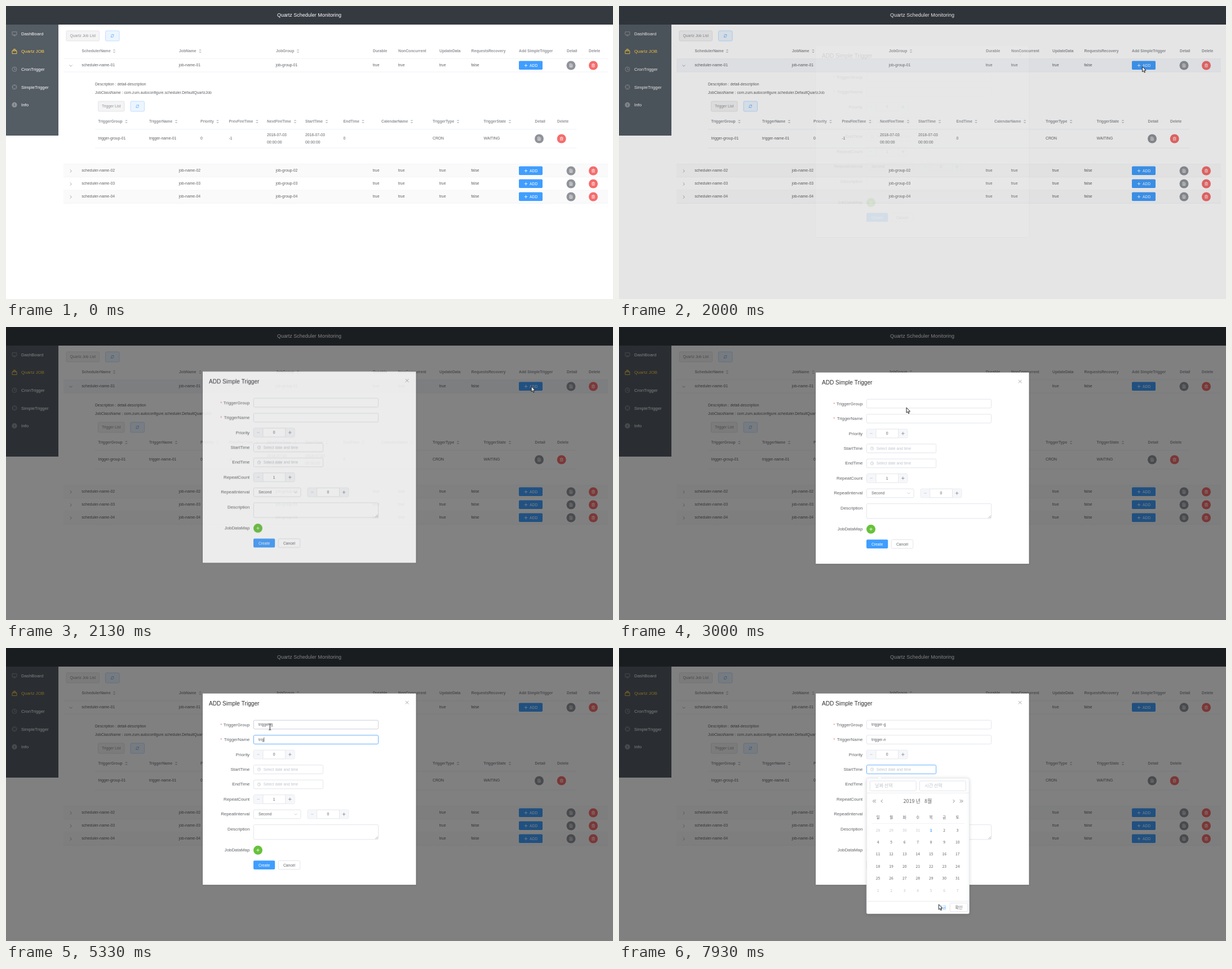
Write an HTML page with a canvas that moves like this. It is 1077x520 px and loops after 8000 ms.

```html
<!DOCTYPE html>
<html lang="en">
<head>
<meta charset="utf-8">
<title>Quartz Scheduler Monitoring</title>
<style>
  html, body { margin: 0; width: 100%; height: 100%; overflow: hidden; background: #fff; }
  canvas { display: block; width: 1077px; height: 520px; }
</style>
</head>
<body>
<canvas id="stage"></canvas>
<script>
const W = 1077, H = 520, LOOP = 8000, TICK = 1000 / 15;
const SANS = '"Liberation Sans", Arial, sans-serif';
const KOREAN = '"Noto Sans CJK KR", "Noto Sans CJK", "Noto Sans CJK JP", "Noto Sans", sans-serif';
const BLUE = '#409eff', RED = '#f56c6c', GREY = '#909399', INK = '#606266';
const BORDER = '#dcdfe6', PALE = '#c0c4cc', LINE = '#ebeef5';

const stage = document.getElementById('stage');
const layer = document.createElement('canvas');
const dpr = window.devicePixelRatio || 1;
const [main, sheet] = [stage, layer].map(el => {
  el.width = Math.round(W * dpr);
  el.height = Math.round(H * dpr);
  const ctx = el.getContext('2d');
  ctx.scale(dpr, dpr);
  return ctx;
});
let c = main;

// ---- helpers ----
const clamp = v => Math.max(0, Math.min(1, v));

function bezier(x1, y1, x2, y2) {
  const at = (a, b, s) => 3 * a * s * (1 - s) ** 2 + 3 * b * s * s * (1 - s) + s ** 3;
  return x => {
    let lo = 0, hi = 1;
    for (let i = 0; i < 24; i++) {
      const mid = (lo + hi) / 2;
      if (at(x1, x2, mid) < x) lo = mid; else hi = mid;
    }
    return at(y1, y2, (lo + hi) / 2);
  };
}
const ease = bezier(.25, .1, .25, 1);
const easeOut = bezier(.23, 1, .32, 1);

function mix(a, b, k) {
  const part = (s, i) => parseInt(s.slice(i, i + 2), 16);
  return `rgb(${[1, 3, 5].map(i => Math.round(part(a, i) + (part(b, i) - part(a, i)) * k))})`;
}

function text(s, x, y, size, color, opt = {}) {
  c.font = `${opt.bold ? 'bold ' : ''}${size}px ${opt.font || SANS}`;
  c.textAlign = opt.align || 'left';
  c.fillStyle = color;
  c.fillText(s, x, y);
}

function box(x, y, w, h, fill, stroke, radius = 2) {
  c.beginPath();
  c.roundRect(x, y, w, h, radius);
  if (fill) { c.fillStyle = fill; c.fill(); }
  if (stroke) { c.strokeStyle = stroke; c.lineWidth = .8; c.stroke(); }
}

function rect(x, y, w, h, fill) {
  c.fillStyle = fill;
  c.fillRect(x, y, w, h);
}

function disc(x, y, r, fill) {
  c.beginPath();
  c.arc(x, y, r, 0, 7);
  c.fillStyle = fill;
  c.fill();
}

function strokePath(d, x, y, color, width = .7) {
  c.save();
  c.translate(x, y);
  c.strokeStyle = color;
  c.lineWidth = width;
  c.stroke(new Path2D(d));
  c.restore();
}

function fillPath(d, x, y, color) {
  c.save();
  c.translate(x, y);
  c.fillStyle = color;
  c.fill(new Path2D(d));
  c.restore();
}

// ---- icons ----
const ICON = {
  plus: 'M-2.8 0H2.8M0 -2.8V2.8',
  minus: 'M-2.3 0H2.3',
  close: 'M-2.8 -2.8L2.8 2.8M2.8 -2.8L-2.8 2.8',
  right: 'M-1.3 -2.6L1.3 0L-1.3 2.6',
  left: 'M1.3 -2.6L-1.3 0L1.3 2.6',
  down: 'M-2.6 -1.3L0 1.3L2.6 -1.3',
  refresh: 'M-2.3 -.4A2.4 2.4 0 0 1 2 -1.4M2.3 -2.6V-1.1H.8M2.3 .4A2.4 2.4 0 0 1 -2 1.4M-2.3 2.6V1.1H-.8',
  page: 'M-2.3 -2.8H1L2.3 -1.5V2.8H-2.3ZM-1.1 -.9H1M-1.1 .4H1.1M-1.1 1.6H1.1',
  trash: 'M-2.8 -1.7H2.8M-1 -1.7V-2.8H1V-1.7M-2.1 -1.7V2.7H2.1V-1.7M-.7 -.4V1.5M.7 -.4V1.5',
  clock: 'M4 0A4 4 0 1 1 -4 0A4 4 0 1 1 4 0M0 -2.5V.3H2.2',
  smallClock: 'M2.7 0A2.7 2.7 0 1 1 -2.7 0A2.7 2.7 0 1 1 2.7 0M0 -1.6V.2H1.5',
  monitor: 'M-4 -3.2H4V2.2H-4ZM-2 3.8H2M0 2.2V3.8',
  goods: 'M-4 -1H4V4H-4ZM-3.3 -1L-2.4 -2.7H2.4L3.3 -1M-1.7 -4H1.7',
  aim: 'M4 0A4 4 0 1 1 -4 0A4 4 0 1 1 4 0M0 -4V-1.7M0 4V1.7M-4 0H-1.7M4 0H1.7'
};
const icon = (name, x, y, color, width) => strokePath(ICON[name], x, y, color, width);

function sorter(x, y) {
  fillPath('M-2.5 -.9L0 -3.3L2.5 -.9ZM-2.5 .9L0 3.3L2.5 .9Z', x, y, PALE);
}

function roundButton(name, x, y, fill) {
  disc(x, y, 8, fill);
  icon(name, x, y, '#fff');
}

function listBar(label, x, y, w) {
  box(x, y, w, 18, '#f4f4f5', '#dedfe2');
  text(label, x + w / 2, y + 11.3, 6.8, GREY, { align: 'center' });
  const bx = x + w + 11;
  box(bx, y, 24.5, 18, '#ecf5ff', '#b3d8ff');
  icon('refresh', bx + 12.2, y + 9, BLUE);
}

// ---- page ----
function drawFrame() {
  rect(0, 0, W, H, '#fff');
  rect(0, 0, W, 33, '#343a40');
  text('Quartz Scheduler Monitoring', 538, 18.7, 8.98, '#fff', { align: 'center' });
  rect(0, 33, 93, 197, '#545c64');
  const menu = [['monitor', 'DashBoard'], ['goods', 'Quartz JOB'], ['clock', 'CronTrigger'],
    ['aim', 'SimpleTrigger'], ['info', 'Info']];
  menu.forEach(([name, label], i) => {
    const y = 49 + 31.6 * i, on = i === 1;
    if (name === 'info') {
      disc(15, y, 4.6, GREY);
      text('i', 15, y + 2.5, 7, '#545c64', { align: 'center', bold: true });
    } else icon(name, 15, y, on ? '#ffd04b' : GREY, .9);
    text(label, 27, y + 2.8, 7.87, on ? '#ffd04b' : '#fff');
  });
}

function header(cols, y) {
  for (const [label, x, sortX] of cols) {
    text(label, x, y + 2.2, 6.78, GREY, { bold: true });
    if (sortX) sorter(sortX, y);
  }
}

const JOB_COLS = [['SchedulerName', 134.5, 192], ['JobName', 307, 344.5], ['JobGroup', 479, 518],
  ['Durable', 651], ['NonConcurrent', 696], ['UpdateData', 769], ['RequestsRecovery', 825.5],
  ['Add SimpleTrigger', 910], ['Detail', 995], ['Delete', 1034]];
const TRIGGER_COLS = [['TriggerGroup', 163.5, 213.5], ['TriggerName', 254, 302], ['Priority', 345, 375.5],
  ['PrevFireTime', 395.5, 445.5], ['NextFireTime', 463, 513], ['StartTime', 531, 569],
  ['EndTime', 598.5, 633.5], ['CalendarName', 666, 720], ['TriggerType', 757, 802],
  ['TriggerState', 847.5, 894], ['Detail', 938.5], ['Delete', 978]];

function jobRow(n, top, hover) {
  const y = top + 11.5, open = n === 1;
  rect(102, top, 966, 23, hover ? '#f5f7fa' : n % 2 ? '#fff' : '#fafafa');
  rect(102, top + 22.6, 966, .8, LINE);
  icon(open ? 'down' : 'right', 115, y + .4, GREY, .8);
  const cells = [`scheduler-name-0${n}`, `job-name-0${n}`, `job-group-0${n}`, 'true', 'true', 'true', 'false'];
  cells.forEach((s, i) => text(s, JOB_COLS[i][1] - .3, y + 1.7, 6.83, INK));
  box(910, y - 8, 42, 15.6, BLUE, null, 1.8);
  icon('plus', 922.5, y, '#fff', .8);
  text('ADD', 929, y + 2.4, 6.75, '#fff');
  roundButton('page', 1002.5, y, GREY);
  roundButton('trash', 1042, y, RED);
}

function drawPage(hover) {
  drawFrame();
  listBar('Quartz Job List', 107, 44, 58.5);
  header(JOB_COLS, 80);
  rect(102, 93.3, 966, .8, LINE);
  jobRow(1, 94, hover);

  text('Description : detail-description', 158, 141.3, 6.75, INK);
  text('JobClassName : com.zum.autoconfigure.scheduler.DefaultQuartzJob', 158, 156, 6.75, INK);
  listBar('Trigger List', 163.5, 169, 46.5);
  header(TRIGGER_COLS, 205);
  rect(158, 218.4, 854, .8, LINE);
  const cells = [['trigger-group-01', 0], ['trigger-name-01', 1], ['0', 2], ['-1', 3], ['0', 6],
    ['CRON', 8], ['WAITING', 9]];
  for (const [s, i] of cells) text(s, TRIGGER_COLS[i][1], 237.2, 6.8, INK);
  for (const x of [463, 531]) {
    text('2018-07-03', x, 230.8, 6.8, INK);
    text('00:00:00', x, 243.7, 6.8, INK);
  }
  roundButton('page', 946, 235.5, GREY);
  roundButton('trash', 985.7, 235.5, RED);
  rect(158, 251.6, 854, .8, LINE);

  rect(102, 280.4, 966, .8, LINE);
  for (let n = 2; n < 5; n++) jobRow(n, 281 + 23 * (n - 2), false);
}

// ---- dialog state: typing and focus, in ticks ----
const FIELDS = {
  group: { value: 'trigger-g', keys: [50, 53, 55, 57, 58, 60, 62, 63, 65], from: 46, fade: 43, to: 69 },
  name: { value: 'trigger-n', keys: [74, 77, 78, 80, 81, 84, 85, 87, 90], from: 69, fade: 69, to: 110 },
  start: { value: '', keys: [], from: 110, fade: 110, to: 999 }
};

function focusColor(f, tick, idle) {
  const k = n => ease(clamp((tick - n + .3) / 3));
  if (tick < f.from) return idle;
  return tick < f.to ? mix(idle, BLUE, k(f.fade)) : mix(BLUE, idle, k(f.to));
}

function caret(f, tick, x, y) {
  if (tick < f.from || tick >= f.to) return;
  const last = Math.max(f.from, ...f.keys.filter(k => k <= tick));
  if ((tick - last) % 16 < 8) rect(x, y - 4, .7, 8, '#303133');
}

function textField(f, y, tick, idle) {
  box(439.4, y - 7.8, 221.2, 15.6, '#fff', focusColor(f, tick, idle));
  const typed = f.value.slice(0, f.keys.filter(k => k <= tick).length);
  text(typed, 448, y + 2.3, 6.85, INK);
  caret(f, tick, 448 + c.measureText(typed).width, y);
}

function stepper(x, y, value) {
  box(x, y - 7.8, 72.6, 15.6, '#fff', BORDER);
  rect(x + .4, y - 7.4, 16, 14.8, '#f5f7fa');
  rect(x + 56.2, y - 7.4, 16, 14.8, '#f5f7fa');
  rect(x + 16.2, y - 7.6, .7, 15.2, BORDER);
  rect(x + 56, y - 7.6, .7, 15.2, BORDER);
  icon('minus', x + 8.2, y, PALE, .8);
  icon('plus', x + 64.4, y, INK, .6);
  text(value, x + 36.3, y + 2.4, 6.85, INK, { align: 'center' });
}

function dateField(y, stroke) {
  box(439.4, y - 7.8, 123.2, 15.6, '#fff', stroke);
  icon('smallClock', 449, y, PALE, .7);
  text('Select date and time', 456.7, y + 2.3, 6.77, PALE);
}

function drawDialog(tick) {
  c.save();
  c.shadowColor = 'rgba(0,0,0,.3)';
  c.shadowBlur = 2 * dpr;
  c.shadowOffsetY = .6 * dpr;
  rect(349, 80.7, 378.5, 339.6, '#fff');
  c.restore();
  text('ADD Simple Trigger', 360, 102, 10.1, '#303133');
  icon('close', 711.6, 96.7, GREY, .8);

  const labels = ['TriggerGroup', 'TriggerName', 'Priority', 'StartTime', 'EndTime', 'RepeatCount',
    'RepeatInterval', 'Description'];
  labels.forEach((s, i) => {
    const y = 138.6 + 26.45 * i;
    text(s, 432.3, y, 7.87, INK, { align: 'right' });
    if (i < 2) text('*', 380.3, y, 7.87, RED);
  });
  text('JobDataMap', 432.3, 361, 7.87, INK, { align: 'right' });

  const hovered = tick >= 46 && tick < 101;
  textField(FIELDS.group, 136, tick, hovered ? PALE : BORDER);
  textField(FIELDS.name, 162.6, tick, BORDER);
  stepper(439.4, 189, '0');
  dateField(215.5, focusColor(FIELDS.start, tick, BORDER));
  caret(FIELDS.start, tick, 456.5, 215.5);
  dateField(242, BORDER);
  stepper(439.4, 268.4, '1');
  box(439.4, 287.2, 83.6, 15.6, '#fff', BORDER);
  text('Second', 448, 297.3, 6.85, INK);
  icon('down', 514, 295, PALE, .8);
  stepper(535.2, 295, '0');
  box(439.4, 313.6, 221.2, 26.2, '#fff', BORDER);
  strokePath('M-4.5 0L0 -4.5M-2 0L0 -2', 659.8, 339, GREY, .7);
  disc(447, 358.8, 8, '#67c23a');
  icon('plus', 447, 358.8, '#fff', .8);
  box(439, 377.2, 38.2, 15.8, BLUE);
  text('Create', 458.1, 387.5, 6.75, '#fff', { align: 'center' });
  box(483.2, 377.5, 38.5, 15.4, '#fff', BORDER);
  text('Cancel', 502.5, 387.5, 6.75, INK, { align: 'center' });
}

// ---- date picker ----
function drawPicker() {
  const ko = { font: KOREAN }, mid = { font: KOREAN, align: 'center' };
  c.save();
  c.shadowColor = 'rgba(0,0,0,.15)';
  c.shadowBlur = 7 * dpr;
  c.shadowOffsetY = 1 * dpr;
  box(439.3, 231, 182, 240.5, '#fff', '#e4e7ed');
  c.restore();
  fillPath('M-3.4 .6L0 -2.8L3.4 .6Z', 462.5, 231, '#fff');
  [['날짜 선택', 445.3], ['시간 선택', 533.3]].forEach(([s, x]) => {
    box(x, 236, 82, 17.6, '#fff', BORDER);
    text(s, x + 9, 247.4, 8, PALE, ko);
  });
  rect(439.6, 256.8, 181.4, .7, '#e4e4e4');

  for (const dx of [-1.3, 1.5]) {
    icon('left', 453 + dx, 271.8, INK, .8);
    icon('right', 607.4 + dx, 271.8, INK, .8);
  }
  icon('left', 466.3, 271.8, INK, .8);
  icon('right', 594, 271.8, INK, .8);
  text('2019 년', 504.5, 275.4, 9, INK, ko);
  text('8월', 542, 275.4, 9, INK, ko);

  const colX = i => 459.6 + 23.52 * i;
  [...'일월화수목금토'].forEach((s, i) => text(s, colX(i), 302.9, 6.75, INK, mid));
  rect(448, 311.2, 164.5, .7, LINE);
  for (let i = 0; i < 42; i++) {
    const day = i - 3, inMonth = day > 0 && day < 32;
    const label = day < 1 ? day + 31 : day > 31 ? day - 31 : day;
    const color = day === 1 ? BLUE : inMonth ? INK : PALE;
    text(label, colX(i % 7), 325.6 + 21.4 * Math.floor(i / 7), 6.75, color, { ...mid, bold: day === 1 });
  }

  rect(439.6, 449.2, 181.4, .7, '#e4e4e4');
  text('지금', 574, 462.6, 7, BLUE, mid);
  box(587.3, 452.6, 31.4, 15.2, '#fff', BORDER);
  text('확인', 603, 462.6, 7, INK, mid);
}

// ---- pointer: tick, x, y, shape ----
const TRAIL = [
  [3, 690, 77, 'arrow'], [8, 800, 84, 'arrow'], [14, 932, 106, 'hand'], [15, 941, 108, 'hand'],
  [17, 920, 108, 'hand'], [18, 928.5, 108.5, 'hand'], [29, 928.5, 108.5, 'hand'],
  [30, 928.5, 107.5, 'arrow'], [32, 932.2, 105.5, 'arrow'], [41, 941, 99, 'arrow'],
  [43, 770, 116, 'arrow'], [45, 510, 143, 'arrow'], [46, 468.3, 140, 'beam'], [99, 468.3, 140, 'beam'],
  [100, 467.5, 147, 'arrow'], [102, 465, 163, 'beam'], [103, 463, 172, 'arrow'],
  [106, 455, 207, 'beam'], [107, 453, 213, 'beam'], [110, 453, 213, 'beam'],
  [111, 456, 222, 'arrow'], [119, 567.3, 455, 'arrow']
];

function pointerAt(tick) {
  const i = TRAIL.findLastIndex(k => k[0] <= tick);
  if (i < 0) return null;
  const a = TRAIL[i], b = TRAIL[i + 1] || a;
  const k = b === a ? 0 : (tick - a[0]) / (b[0] - a[0]);
  return { x: a[1] + (b[1] - a[1]) * k, y: a[2] + (b[2] - a[2]) * k, shape: a[3] };
}

const SHAPES = {
  arrow: 'M0 0V9.2L2.1 7.3L3.6 10.6L5 10L3.6 6.8H6.5Z',
  hand: 'M0 1Q1 -.2 2 1V4.6L5.6 5.3Q6.6 5.6 6.5 7L5.7 12.4H.2L-2.8 8.2Q-2.9 6.9 -1.6 7.3L0 8.4Z'
};

function drawPointer({ x, y, shape }) {
  if (shape === 'beam') {
    strokePath('M-2 -5.3H-.5L0 -4.8L.5 -5.3H2M0 -4.8V4.8M-2 5.3H-.5L0 4.8L.5 5.3H2', x, y, '#111', .9);
    return;
  }
  fillPath(SHAPES[shape], x, y, '#fff');
  strokePath(SHAPES[shape], x, y, '#111', .9);
}

// ---- composition ----
function onLayer(draw, alpha, dy = 0, scaleY = 1, originY = 0) {
  sheet.clearRect(0, 0, W, H);
  c = sheet;
  draw();
  c = main;
  c.save();
  c.globalAlpha = alpha;
  c.translate(0, originY + dy);
  c.scale(1, scaleY);
  c.drawImage(layer, 0, -originY, W, H);
  c.restore();
}

function render(ms) {
  const tick = Math.floor((ms + 4) / TICK);
  const t = tick * TICK;
  const pointer = pointerAt(tick);
  drawPage(pointer && tick < 42 && pointer.y > 94);

  const since = t - 1968;
  if (since > 0) {
    rect(0, 0, W, H, `rgba(0,0,0,${.5 * ease(clamp(since / 200))})`);
    const k = ease(clamp(since / 300));
    onLayer(() => drawDialog(tick), k, -11.2 * (1 - k));
  }
  if (tick >= 110) {
    const k = easeOut(clamp((t - 7313) / 300));
    onLayer(drawPicker, k, 0, k, 231);
  }
  if (pointer) drawPointer(pointer);
}

const begun = performance.now();
function loop() {
  render((performance.now() - begun) % LOOP);
  requestAnimationFrame(loop);
}
loop();
</script>
</body>
</html>
```
